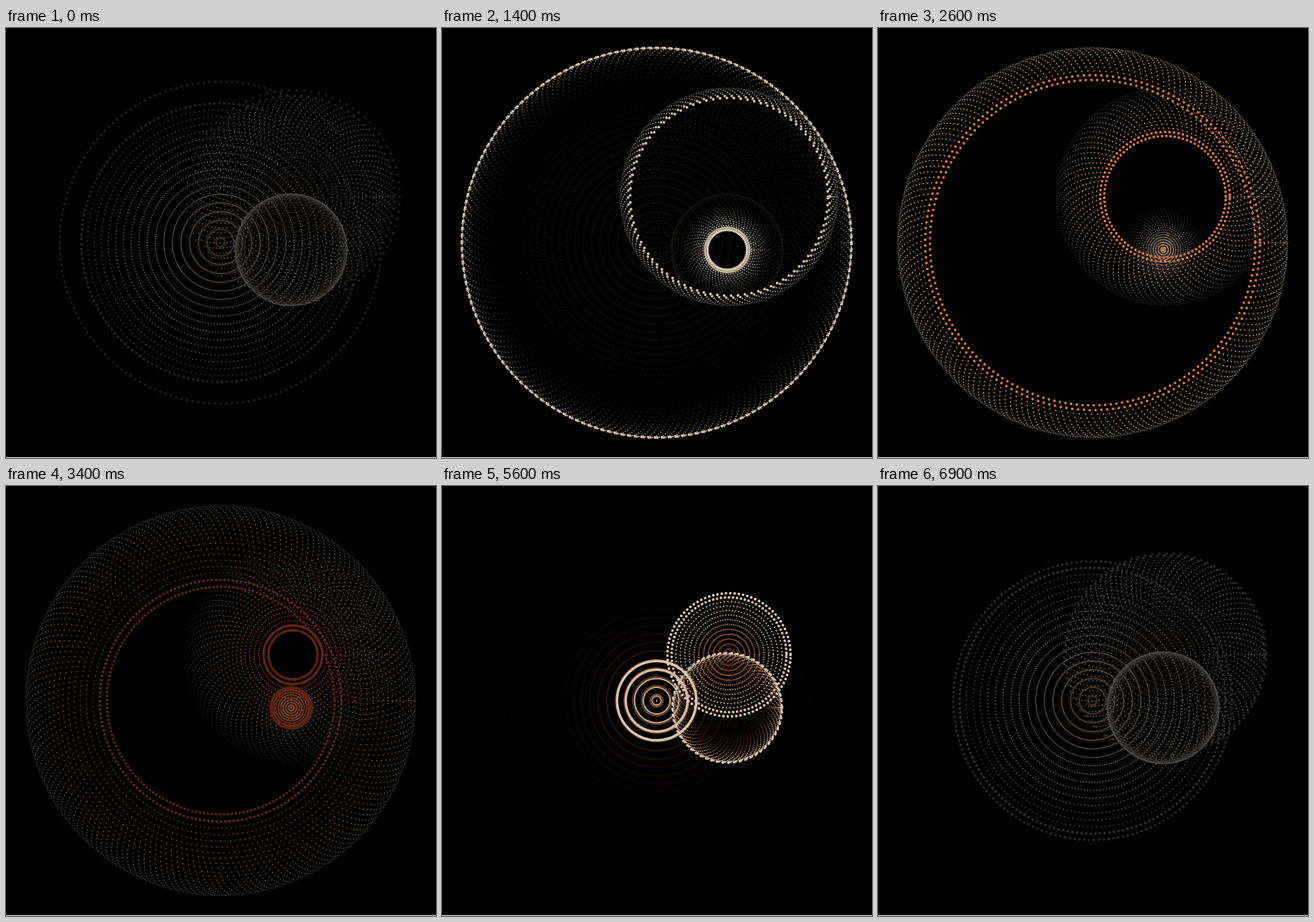
Animation, 600 px wide and 600 px high, one loop 7 s. Source, as an HTML page with a canvas:

```html
<!DOCTYPE html>
<html lang="en">
<head>
<meta charset="utf-8">
<title>Pulsing dot rings</title>
<style>
  html, body { margin: 0; width: 100%; height: 100%; overflow: hidden; background: #fff; }
  canvas { display: block; width: 600px; height: 599px; }
</style>
</head>
<body>
<canvas id="stage" width="600" height="599"></canvas>
<script>
const ctx = document.getElementById('stage').getContext('2d');
const STEPS = 70, STEP_MS = 100, TRAIL = 35, TAU = Math.PI * 2;
const SPEED = 0.0455; // phase per step
const REST = 3.8;     // steps a ring stays closed
const TURN = 0.3;     // share of a dot gap turned per step

// shut: step at which the ring closes
const rings = [
  { x: 299.5, y: 299.5, size: 272, dots: 180, shut: 47.7 },
  { x: 400.5, y: 235.5, size: 152, dots: 90, shut: 39 },
  { x: 398, y: 309.5, size: 78, dots: 60, shut: 22 }
];

// Light peaks twice a loop; the hue warms from beige to rust and back.
function colorAt(step, gain) {
  const phase = step / STEPS * TAU;
  const light = Math.abs(Math.sin(phase)) ** 1.2;
  const warm = (1 - Math.cos(phase)) / 2;
  const red = (30 + 50 * warm + (160 + 60 * warm) * light) * gain;
  const green = red * (0.98 - 0.6 * warm * warm);
  const blue = red * Math.max(0.15, 0.92 - warm * warm);
  return `rgb(${red},${green},${blue})`;
}

function fade(age) {
  return Math.max(0, 1.08 * 0.93 ** age - 0.08);
}

function radiusAt(ring, step) {
  const away = Math.max(ring.shut - step, step - ring.shut - REST, 0);
  return ring.size * Math.sin(away * SPEED);
}

function drawRing(ring, step, dot) {
  const r = radiusAt(ring, step);
  const gap = TAU / ring.dots;
  const turn = step * TURN % 1 * gap;
  const add = angle => {
    const x = ring.x + r * Math.cos(angle), y = ring.y + r * Math.sin(angle);
    ctx.moveTo(x + dot, y);
    ctx.arc(x, y, dot, 0, TAU);
  };
  ctx.beginPath();
  add(0);
  for (let i = 0; i < ring.dots; i++) add(turn + i * gap);
  ctx.fill();
}

function draw(now) {
  ctx.fillStyle = '#000';
  ctx.fillRect(0, 0, 600, 599);
  for (let age = TRAIL; age >= 0; age--) {
    const step = (now - age + STEPS) % STEPS;
    ctx.fillStyle = colorAt(step, fade(age));
    const dot = age < 2 ? 1.9 : 1.1;
    for (const ring of rings) drawRing(ring, step, dot);
  }
}

const start = performance.now();
let shown = -1;
function tick() {
  const step = Math.floor((performance.now() - start) / STEP_MS) % STEPS;
  if (step !== shown) draw(shown = step);
  requestAnimationFrame(tick);
}
tick();
</script>
</body>
</html>
```
